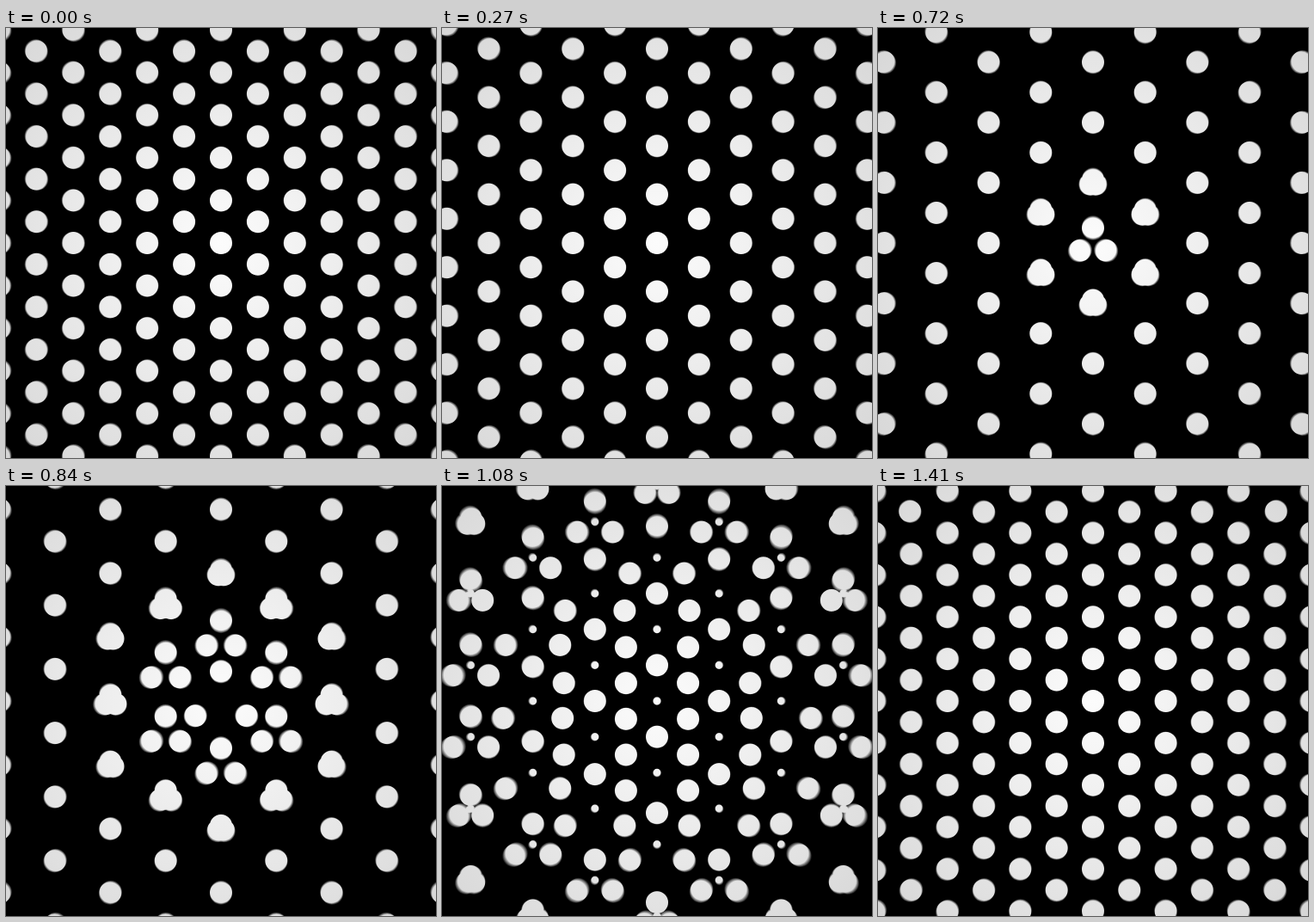
An HTML page with a canvas that plays this animation: 500x500 px, repeating every 1440 ms.

```html
<!DOCTYPE html>
<html lang="en">
<head>
<meta charset="utf-8">
<title>Splitting dots</title>
<style>
  html, body { margin: 0; width: 100%; height: 100%; overflow: hidden; background: #000; }
  canvas { display: block; }
</style>
</head>
<body>
<canvas id="stage" width="500" height="500"></canvas>
<script>
const ctx = document.getElementById('stage').getContext('2d');
const LOOP = 1440, STEP = 30;
const PITCH = 49.56, RADIUS = 13;
const SPLIT_AT = 540, SPLIT_TIME = 360, DELAY_PER_PX = 1.555;
const GROW_AT = 900, GROW_TIME = 450;
const SHUTTER = 20, SAMPLES = 8;
const COLS = 7, ROWS = 7;
const DIRS = [-90, 30, 150].map(a => [Math.cos(a * Math.PI / 180), Math.sin(a * Math.PI / 180)]);

const shade = ctx.createRadialGradient(250, 250, 0, 250, 250, 354);
shade.addColorStop(0, 'rgb(252,252,252)');
shade.addColorStop(1, 'rgb(214,214,214)');

function ease(u) {
  u = Math.min(1, Math.max(0, u));
  return u * u * (3 - 2 * u);
}

function addDot(x, y, r) {
  ctx.moveTo(x + r, y);
  ctx.arc(x, y, r, 0, 2 * Math.PI);
}

// Each lattice dot sends three dots to its edge midpoints while a fourth grows in its place.
function drawLattice(t) {
  const pitch = PITCH * 2 ** (t / LOOP);
  const core = RADIUS * ease((t - GROW_AT) / GROW_TIME);
  ctx.beginPath();
  for (let i = -COLS; i <= COLS; i++) {
    for (let j = -ROWS; j <= ROWS; j++) {
      const x = i * pitch * Math.sqrt(3) / 2;
      const y = (j + (i & 1) / 2) * pitch;
      const delay = Math.hypot(x, y) * DELAY_PER_PX;
      const d = pitch / 2 * ease((t - SPLIT_AT - delay) / SPLIT_TIME);
      for (const [dx, dy] of DIRS) addDot(x + dx * d, y + dy * d, RADIUS);
      if (core > 0) addDot(x, y, core);
    }
  }
  ctx.fill();
}

function render(t) {
  ctx.globalCompositeOperation = 'source-over';
  ctx.fillStyle = '#000';
  ctx.fillRect(0, 0, 500, 500);

  // Motion blur: sum evenly spaced moments around t.
  ctx.globalCompositeOperation = 'lighter';
  const level = Math.ceil(255 / SAMPLES);
  ctx.fillStyle = `rgb(${level},${level},${level})`;
  ctx.save();
  ctx.translate(250, 250);
  for (let k = 0; k < SAMPLES; k++) {
    const moment = t + SHUTTER * ((k + 0.5) / SAMPLES - 0.5);
    drawLattice((moment + LOOP) % LOOP);
  }
  ctx.restore();

  ctx.globalCompositeOperation = 'multiply';
  ctx.fillStyle = shade;
  ctx.fillRect(0, 0, 500, 500);
}

const start = performance.now();
let shown = -1;

function tick() {
  const t = Math.floor((performance.now() - start) % LOOP / STEP) * STEP;
  if (t !== shown) render(shown = t);
  requestAnimationFrame(tick);
}
tick();
</script>
</body>
</html>
```
